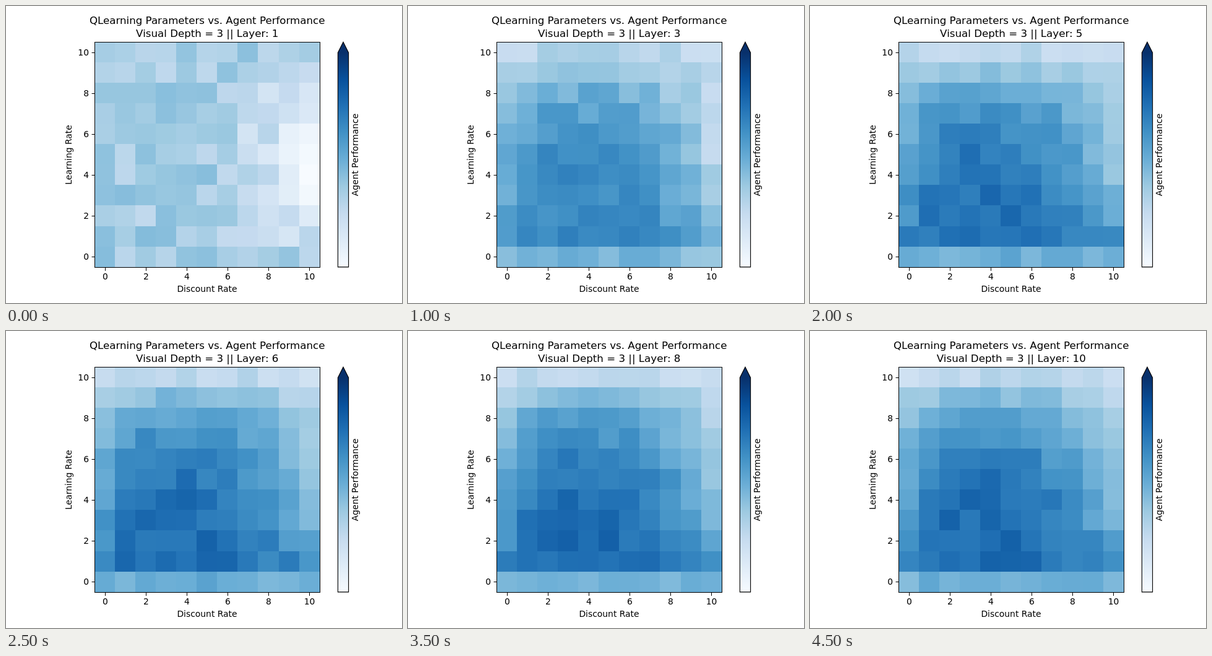
These frames come from a looping animation (640 px wide and 480 px high, 5 s). An HTML page:

```html
<!DOCTYPE html>
<html lang="en">
<head>
<meta charset="utf-8">
<title>Parameter heatmap</title>
<style>
  html, body { margin: 0; width: 100%; height: 100%; overflow: hidden; background: #fff; }
  svg { display: block; width: 640px; height: 480px; }
  text { font-family: "DejaVu Sans", sans-serif; font-size: 13.89px; text-anchor: middle; }
  .title { font-size: 16.67px; }
  .end { text-anchor: end; }
  .line { fill: none; stroke: #000; stroke-width: 1; }
</style>
</head>
<body>
<svg viewBox="0 0 640 480">
  <defs>
    <linearGradient id="ramp" gradientUnits="userSpaceOnUse" x1="0" y1="421.9" x2="0" y2="75.4"></linearGradient>
  </defs>
  <g id="cells" shape-rendering="crispEdges"></g>
  <rect class="line" x="143.5" y="58.5" width="364" height="364"/>
  <g id="axes"></g>
  <path d="M536.4 421.9V75.4L545 58.3L553.6 75.4V421.9Z" fill="url(#ramp)" stroke="#000" stroke-width="1.11"/>
  <text class="title" x="325.2" y="29">QLearning Parameters vs. Agent Performance</text>
  <text class="title" x="325.3" y="50" id="layer"></text>
  <text x="325" y="462">Discount Rate</text>
  <text transform="translate(106 240.5) rotate(-90)">Learning Rate</text>
  <text transform="translate(569 240.5) rotate(-90)">Agent Performance</text>
</svg>
<script>
const N = 11, LAYERS = 10, STEP = 500;
const LEFT = 143.2, BOTTOM = 422.2, CELL = 33.09;
const BLUES = ["#f7fbff", "#deebf7", "#c6dbef", "#9ecae1", "#6baed6",
  "#4292c6", "#2171b5", "#08519c", "#08306b"];

const $ = id => document.getElementById(id);
const mix = (a, b, p) => a + (b - a) * p;

function add(parent, tag, attrs, text = "") {
  const el = document.createElementNS("http://www.w3.org/2000/svg", tag);
  for (const key in attrs) el.setAttribute(key, attrs[key]);
  el.textContent = text;
  parent.appendChild(el);
  return el;
}

const channels = hex => [1, 3, 5].map(i => parseInt(hex.slice(i, i + 2), 16));

function blues(percent) {
  const p = Math.max(0, Math.min(100, percent)) / 12.5;
  const i = Math.min(7, Math.floor(p));
  const from = channels(BLUES[i]), to = channels(BLUES[i + 1]);
  return `rgb(${from.map((c, k) => Math.round(mix(c, to[k], p - i)))})`;
}

// Seeded, from -1 to 1
function noise(x, y, layer) {
  const s = Math.sin(x * 12.99 + y * 78.23 + layer * 37.72) * 43758.55;
  return (s - Math.floor(s)) * 2 - 1;
}

// A flat start grows towards a plateau that falls off at the top and both sides
function score(x, y, layer) {
  const learned = 1 - Math.exp(-0.7 * (layer - 1));
  const plateau = y === 0 ? 51 : 78 - 50 * (y / 10) ** 3.5;
  const bulge = Math.sin(Math.PI * (y + 0.5) / N);
  const right = 34 * (Math.max(0, x - 4) / 6) ** 2;
  const left = 20 * learned * (Math.max(0, 4 - x) / 4) ** 4;
  const spread = mix(9, 5, learned);
  return mix(35, plateau, learned) - bulge * (left + right) + spread * noise(x, y, layer);
}

BLUES.forEach((c, i) => add($("ramp"), "stop", { offset: i / 8, "stop-color": c }));

const edgeX = i => Math.floor(LEFT + i * CELL);
const edgeY = i => Math.floor(BOTTOM - i * CELL);
const cells = [];
for (let y = 0; y < N; y++) {
  for (let x = 0; x < N; x++) {
    const el = add($("cells"), "rect", {
      x: edgeX(x), y: edgeY(y + 1),
      width: edgeX(x + 1) - edgeX(x), height: edgeY(y) - edgeY(y + 1)
    });
    cells.push({ x, y, el });
  }
}

for (let v = 0; v < N; v += 2) {
  const x = Math.floor(LEFT + (v + 0.5) * CELL + 0.3);
  const y = Math.floor(BOTTOM - (v + 0.5) * CELL + 0.3);
  add($("axes"), "path", { class: "line", d: `M${x + 0.5} 423V428M138.5 ${y + 0.5}H143.5` });
  add($("axes"), "text", { x: x + 0.5, y: 442 }, v);
  add($("axes"), "text", { class: "end", x: 134, y: y + 5 }, v);
}

let shown = 0;
function draw(time) {
  const layer = Math.floor(time / STEP) % LAYERS + 1;
  if (layer === shown) return;
  shown = layer;
  $("layer").textContent = `Visual Depth = 3 || Layer: ${layer}`;
  for (const { x, y, el } of cells) el.setAttribute("fill", blues(score(x, y, layer)));
}

function tick() {
  draw(performance.now());
  requestAnimationFrame(tick);
}
tick();
</script>
</body>
</html>
```
